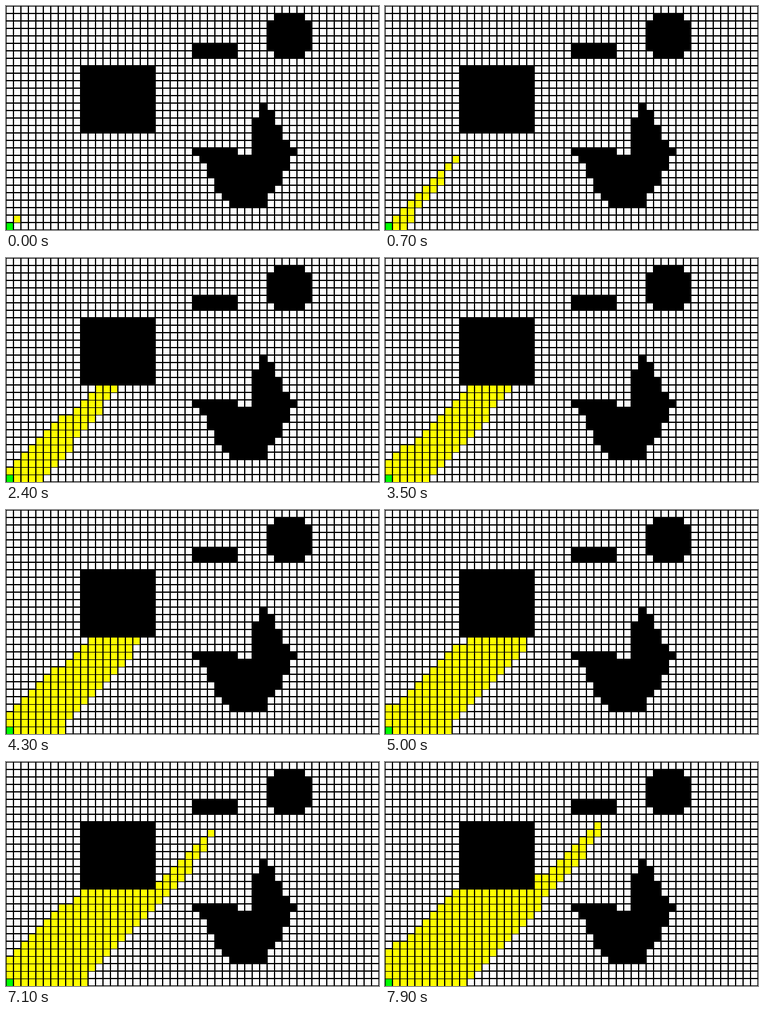
These frames come from a looping animation (600 by 360 pixels, 8000 ms). An HTML page with a canvas:

```html
<!DOCTYPE html>
<html>
<head>
<meta charset="utf-8">
<style>
html, body { margin: 0; width: 100%; height: 100%; overflow: hidden; background: #000; }
canvas { display: block; }
</style>
</head>
<body>
<canvas id="c" width="600" height="360"></canvas>
<script>
const ctx = document.getElementById('c').getContext('2d');
const COLS = 50, ROWS = 30, SIZE = 12;
const LOOP = 8000, FRAME = 100, VISIT = 40;
const START = { x: 0, y: 29 }, GOAL = { x: 45, y: 0 };

// Hand-drawn wall, in cell units
const blob = new Path2D(`M34 13 H34.6 L38.8 19.8 L34.5 27 H29.95
  L25.15 19 H31 V20 H33 V15 H34 Z`);

const inBox = (x, y, left, top, w, h) =>
  x >= left && x < left + w && y >= top && y < top + h;

function isWall(x, y) {
  return inBox(x, y, 10, 8, 10, 9) || inBox(x, y, 25, 5, 6, 2) ||
    Math.hypot(x + 0.5 - 38, y + 0.5 - 4) < 3.2 ||
    ctx.isPointInPath(blob, x + 0.5, y + 0.5);
}

// All open cells, row by row
const cells = [];
for (let y = 0; y < ROWS; y++)
  for (let x = 0; x < COLS; x++)
    cells.push({ x, y, wall: isWall(x, y), g: Infinity, done: false });

const inGrid = (x, y) => inBox(x, y, 0, 0, COLS, ROWS);
const cellAt = (x, y) => cells[y * COLS + x];
const score = c => c.g + Math.hypot(GOAL.x - c.x, GOAL.y - c.y);

// A* over eight neighbours; returns the cells in the order they are visited
function search(limit) {
  const first = cellAt(START.x, START.y);
  const open = new Set([first]), order = [];
  first.g = 0;
  while (open.size && order.length < limit) {
    const cur = [...open].reduce((a, b) => score(b) < score(a) ? b : a);
    open.delete(cur);
    cur.done = true;
    order.push(cur);
    for (let dy = -1; dy <= 1; dy++) {
      for (let dx = -1; dx <= 1; dx++) {
        const x = cur.x + dx, y = cur.y + dy;
        if (!inGrid(x, y)) continue;
        const next = cellAt(x, y), g = cur.g + Math.hypot(dx, dy);
        if (next.wall || next.done || g >= next.g) continue;
        next.g = g;
        open.add(next);
      }
    }
  }
  return order;
}

const visited = search(LOOP / VISIT + 2);

function fillCell({ x, y }, color, height) {
  ctx.fillStyle = color;
  ctx.fillRect(x * SIZE + 1, y * SIZE + 1, SIZE - 2, height);
}

function draw() {
  const t = Math.floor(performance.now() % LOOP / FRAME) * FRAME;
  const count = 2 + Math.floor(t / VISIT);
  ctx.fillStyle = '#000';
  ctx.fillRect(0, 0, COLS * SIZE, ROWS * SIZE);
  for (const c of cells) if (!c.wall) fillCell(c, '#fff', SIZE - 2);
  for (const c of visited.slice(0, count)) fillCell(c, '#ff0', SIZE - 1);
  fillCell(START, '#0f0', SIZE - 1);
  requestAnimationFrame(draw);
}
draw();
</script>
</body>
</html>
```
